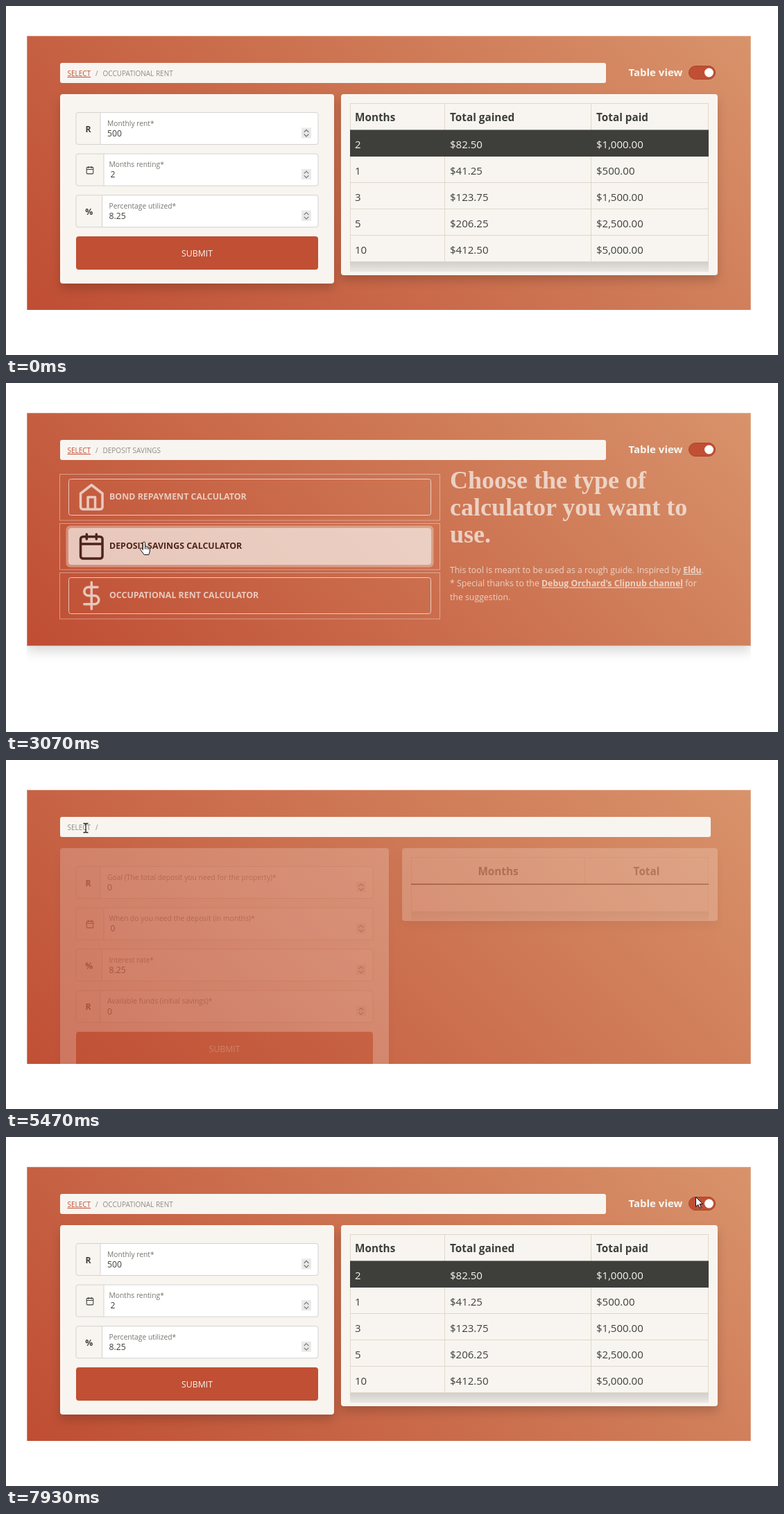
These frames come from a looping animation (1113 by 503 pixels, 8 s). An HTML page:

```html
<!DOCTYPE html>
<html lang="en">
<head>
<meta charset="utf-8">
<title>Property calculators</title>
<style>
  html, body { margin: 0; width: 100%; height: 100%; overflow: hidden; background: #fff; }
  #view { position: absolute; left: 30px; top: 43px; width: 1044px; height: 395px; overflow: hidden; }
  #panel {
    position: absolute; left: 0; top: 0; width: 1044px; box-sizing: border-box;
    background: linear-gradient(45deg, #bf4d33, #d8936b);
    box-shadow: 0 8px 16px rgba(0, 0, 0, .15);
  }
  #edge { position: absolute; inset: 0 0 auto; border: 1px solid rgba(255, 255, 255, .3); box-sizing: border-box; }
  svg { position: absolute; width: 1113px; height: 503px; }
  #ui { left: -30px; top: -43px; }
  #top { left: 0; top: 0; pointer-events: none; }
  text { font-family: "Open Sans", "Noto Sans", sans-serif; fill: #3e3f3a; white-space: pre; }
  .b { font-weight: 700; }
  .u { font-weight: 700; text-decoration: underline; }
  .mid { text-anchor: middle; }
  .cell { font-size: 15px; }
  .head { font-size: 15.3px; font-weight: 700; }
  .label { font-size: 10.3px; fill: #76756f; }
  .value { font-size: 12.2px; }
  .crumb { font-size: 10px; fill: #8e8c84; }
  .crumb.link { fill: #c04f34; text-decoration: underline; }
  .light { fill: #f8f5f0; }
  .title { font: 700 36px "Liberation Serif", "Noto Serif", serif; fill: #f8f5f0; }
  .note { font-size: 12.3px; fill: #f8f5f0; }
  .card { fill: #f8f5f0; filter: drop-shadow(0 8px 7px rgba(0, 0, 0, .17)); }
  .line { fill: none; stroke: #dfd7ca; }
  .icon { fill: none; stroke-width: 2; stroke-linecap: round; stroke-linejoin: round; }
  .choice { color: #f8f5f0; }
  .choice text { fill: currentColor; font-size: 12.4px; font-weight: 700; }
  .choice .icon { stroke: currentColor; }
  .choice .face { fill: none; stroke: #f8f5f0; }
  .choice .ring { display: none; fill: none; stroke: #f8f5f0; stroke-opacity: .5; stroke-width: 4; }
  .choice.on { color: #1e1010; }
  .choice.on .face { fill: #f8f5f0; }
  .choice.on .ring { display: inline; }
</style>
</head>
<body>
<div id="view">
  <div id="panel"></div>
  <div id="edge"></div>
  <svg id="ui" viewBox="0 0 1113 503"></svg>
</div>
<svg id="top" viewBox="0 0 1113 503">
  <g id="arrow" stroke="#111" fill="#fff" stroke-linejoin="round">
    <path d="M.5.5v14l3.3-3.1 2.2 5 2.2-1-2.2-4.8h4.4z"/>
  </g>
  <g id="hand" stroke="#111" fill="#fff" stroke-linejoin="round">
    <path d="M-1.5 1.5q0-1.5 1.5-1.5t1.5 1.5v5q2-.9 2.5.7 1.9-.6 2.3.8 2-.4 2 1.7v4.3l-1.6 4.5h-6.4L-4.6 12q-1.6-2.6-.4-3 1.2-.5 2.3 1l1.2 1.3z"/>
    <path d="M1.5 6.5v4M4 7.5v3M6.3 8.5v2.5" fill="none"/>
  </g>
  <g id="beam" stroke="#222" fill="none">
    <path d="M-3.5-6.5h2.5l1 1 1-1h2.5M-3.5 6.5h2.5l1-1 1 1h2.5M0-5.5v11" stroke-width="1.3"/>
  </g>
</svg>
<script>
const LOOP = 8000, FADE = 300;
const $ = id => document.getElementById(id);

// Markup helpers
const text = (x, y, cls, s) => `<text x="${x}" y="${y}" class="${cls}">${s}</text>`;
const box = (x, y, r, b, attrs) => `<rect x="${x}" y="${y}" width="${r - x}" height="${b - y}" ${attrs}/>`;
const path = (d, cls = 'line', attrs = '') => `<path d="${d}" class="${cls}" ${attrs}/>`;

const ICONS = {
  home: 'M3 9l9-7 9 7v11a2 2 0 0 1-2 2H5a2 2 0 0 1-2-2zM9 22V12h6v10',
  calendar: 'M5 4h14a2 2 0 0 1 2 2v14a2 2 0 0 1-2 2H5a2 2 0 0 1-2-2V6a2 2 0 0 1 2-2zM16 2v4M8 2v4M3 10h18',
  dollar: 'M12 1v22M17 5H9.5a3.5 3.5 0 0 0 0 7h5a3.5 3.5 0 0 1 0 7H6'
};
const icon = (name, cx, cy, k, attrs = '') =>
  path(ICONS[name], 'icon', `transform="translate(${cx - 12 * k} ${cy - 12 * k}) scale(${k})" ${attrs}`);

const PREFIX = { R: 35, cal: 40, '%': 37.5 };

function field(i, right, [kind, label, value]) {
  const y = 153.5 + i * 59.6, b = y + 46, split = 101 + PREFIX[kind], cx = (101 + split) / 2;
  const x = split + (kind === 'cal' ? 7.5 : 10), s = right - 24;
  return box(101, y, right, b, 'rx="3" fill="#fff"') +
    box(101, y, split, b, 'rx="3" fill="#f8f5f0"') +
    box(101, y, right, b, 'rx="3" fill="none" stroke="#d3d3d0"') +
    path(`M${split} ${y}V${b}`, 'line', 'style="stroke:#d3d3d0"') +
    (kind === 'cal' ? icon('calendar', cx, y + 23.5, .53, 'stroke="#3e3f3a"') : text(cx, y + 28, 'value b mid', kind)) +
    text(x, y + 19, 'label', label) +
    text(x + (kind === 'cal' ? 2 : 0), y + 34.3, 'value', value) +
    box(s, y + 22, s + 14, y + 37, 'fill="#e9e9e9"') +
    path(`M${s + 4} ${y + 28}l3-3 3 3M${s + 4} ${y + 31.5}l3 3 3-3`, 'icon', 'stroke="#777" style="stroke-width:1.2"');
}

function form(right, fields) {
  const y = 153 + fields.length * 59.7;
  return box(78, 127, right + 23, y + 68, 'rx="4" class="card"') +
    fields.map((f, i) => field(i, right, f)).join('') +
    box(101, y, right, y + 48, 'rx="4" fill="#c04f34"') +
    text((101 + right) / 2, y + 28.8, 'light mid" style="font-size:12.3px', 'SUBMIT');
}

const under = (x, y, b) => box(x, y, 1013, b, 'fill="url(#under)"');

function rentPage() {
  const cols = [503, 640, 851];
  const rows = [
    ['2', '$82.50', '$1,000.00'], ['1', '$41.25', '$500.00'], ['3', '$123.75', '$1,500.00'],
    ['5', '$206.25', '$2,500.00'], ['10', '$412.50', '$5,000.00']
  ];
  let s = form(450, [
    ['R', 'Monthly rent*', '500'], ['cal', 'Months renting*', '2'], ['%', 'Percentage utilized*', '8.25']
  ]);
  s += box(483, 127, 1026, 388, 'rx="4" class="card"') + under(496, 369, 383);
  s += box(496.5, 140.5, 1012.5, 368.5, 'class="line"');
  s += path('M632.5 140V369M843.5 140V369M496 254.5H1013M496 292.5H1013M496 330.5H1013');
  s += box(496, 178.5, 1013, 217, 'fill="#3e3f3a"');
  s += ['Months', 'Total gained', 'Total paid'].map((h, i) => text(cols[i], 166, 'head', h)).join('');
  rows.forEach((row, j) => row.forEach((c, i) =>
    s += text(cols[i], 204.5 + j * 38, j ? 'cell' : 'cell light', c)));
  return s;
}

function savePage() {
  return form(529, [
    ['R', 'Goal (The total deposit you need for the property)*', '0'],
    ['cal', 'When do you need the deposit (in months)*', '0'],
    ['%', 'Interest rate*', '8.25'],
    ['R', 'Available funds (initial savings)*', '0']
  ]) +
    box(571, 127, 1026, 232, 'rx="4" class="card"') + under(584, 219, 231) +
    box(584.5, 140.5, 1012.5, 218.5, 'class="line"') + path('M834.5 140V179') +
    path('M584 179H1013', 'line', 'style="stroke:#3e3f3a;stroke-width:2"') +
    text(709.5, 166, 'head mid', 'Months') + text(923.5, 166, 'head mid', 'Total');
}

function menuPage() {
  const items = [['home', 'BOND REPAYMENT'], ['calendar', 'DEPOSIT SAVINGS'], ['dollar', 'OCCUPATIONAL RENT']];
  const choice = ([pic, name], i) => {
    const y = 71 * i;
    return '<g class="choice">' +
      box(77.5, y + 131.5, 625.5, y + 198, 'fill="none" stroke="#f8f5f0" stroke-opacity=".6"') +
      box(88.5, y + 136.5, 614.5, y + 192.5, 'rx="4" class="ring"') +
      box(90.5, y + 138.5, 612.5, y + 190.5, 'rx="3" class="face"') +
      icon(pic, 123.3, y + 164.5, 1.75) + text(149, y + 167.5, '', name + ' CALCULATOR') + '</g>';
  };
  return items.map(choice).join('') +
    ['Choose the type of', 'calculator you want to', 'use.'].map((s, i) => text(640, 151.5 + i * 39, 'title', s)).join('') +
    text(640, 274, 'note', 'This tool is meant to be used as a rough guide. Inspired by <tspan class="u">Eldu</tspan>.') +
    text(640, 293.3, 'note', '* Special thanks to the <tspan class="u">Debug Orchard\'s Clipnub channel</tspan> for') +
    text(640, 312.6, 'note', 'the suggestion.');
}

const crumbs = (id, right, name) => `<g id="${id}">` +
  box(78, 82, right, 111, 'rx="3" fill="#f8f5f0"') +
  text(88.5, 101, name ? 'crumb link' : 'crumb', 'SELECT') +
  text(129, 101, 'crumb', '/') + text(139.5, 101, 'crumb', name) +
  (name ? text(897.5, 101, 'b light" style="font-size:15px', 'Table view') +
    box(984.5, 86.5, 1022.5, 105.5, 'rx="9.5" fill="#c04f34" stroke="#a9452e"') +
    '<circle cx="1013.5" cy="96" r="6.5" fill="#fff"/>' : '') + '</g>';

const PAGES = {
  rent: { height: 396, right: 450, rows: 3, draw: rentPage },
  save: { height: 456, right: 529, rows: 4, draw: savePage },
  menu: { height: 336, draw: menuPage }
};

$('ui').innerHTML =
  `<defs><linearGradient id="under" x2="0" y2="1">
    <stop stop-color="#d2cfca"/><stop offset="1" stop-color="#ebe8e3"/></linearGradient></defs>` +
  crumbs('nav-rent', 865, 'OCCUPATIONAL RENT') + crumbs('nav-save', 865, 'DEPOSIT SAVINGS') + crumbs('nav-menu', 1016, '') +
  Object.keys(PAGES).map(k => `<g id="page-${k}">${PAGES[k].draw()}</g>`).join('');
const choices = [...document.querySelectorAll('.choice')];

// Clicks that change the route, and pointer stops: time, x, y
const ROUTES = [[-1000, 'rent'], [1880, 'menu'], [2965, 'save'], [5263, 'menu'], [6508, 'rent']];
const STOPS = [
  [690, 305, 390], [1470, 112, 98], [1600, 96, 94], [1900, 96, 94], [2650, 199, 229], [4130, 199, 229],
  [4270, 201, 184], [4900, 115, 98], [5750, 115, 98], [6130, 318, 323], [6950, 318, 323], [7900, 994, 86]
];

const ease = p => { p = Math.min(1, Math.max(0, p)); return p * p * (3 - 2 * p); };

function pointer(t) {
  const i = STOPS.findIndex(s => s[0] > t);
  if (i < 0) return STOPS[STOPS.length - 1].slice(1);
  if (!i) return null;
  const [a, x, y] = STOPS[i - 1], [b, u, v] = STOPS[i], p = ease((t - a) / (b - a));
  return [x + (u - x) * p, y + (v - y) * p];
}

const choiceAt = ([x, y]) =>
  x > 90 && x < 613 ? [0, 1, 2].findIndex(i => y > 138 + 71 * i && y < 191 + 71 * i) : -1;

function shape(pos, route, page) {
  const [x, y] = pos;
  if (y > 82 && y < 111) return x < 88 || x > 124 ? 'arrow' : route === 'menu' ? 'beam' : 'hand';
  if (page === 'menu') return choiceAt(pos) < 0 ? 'arrow' : 'hand';
  const { right, rows } = PAGES[page], row = Math.floor((y - 153) / 59.6);
  if (x < 101 || x > right || row < 0 || row > rows || (y - 153) % 59.6 > 47) return 'arrow';
  return row === rows ? 'hand' : x > 138 ? 'beam' : 'arrow';
}

function render(t) {
  const n = ROUTES.filter(r => r[0] <= t).length - 1;
  const [start, route] = ROUTES[n], age = t - start, leaving = age < FADE;
  const page = leaving ? ROUTES[n - 1][1] : route;
  const alpha = leaving ? 1 - ease(age / FADE) : ease((age - FADE) / FADE);
  for (const k in PAGES) {
    $('nav-' + k).style.display = k === route ? '' : 'none';
    $('page-' + k).style.display = k === page ? '' : 'none';
  }
  $('page-' + page).style.opacity = alpha;
  $('panel').style.height = $('edge').style.height = PAGES[page].height + 'px';

  const pos = pointer(t), kind = pos && shape(pos, route, page);
  const over = pos && page === 'menu' ? choiceAt(pos) : -1;
  choices.forEach((c, i) => c.classList.toggle('on', i === over));
  for (const k of ['arrow', 'hand', 'beam']) {
    $(k).style.display = k === kind ? '' : 'none';
    if (k === kind) $(k).setAttribute('transform', `translate(${pos})`);
  }
}

const t0 = performance.now();
(function tick() {
  render((performance.now() - t0) % LOOP);
  requestAnimationFrame(tick);
})();
</script>
</body>
</html>
```
